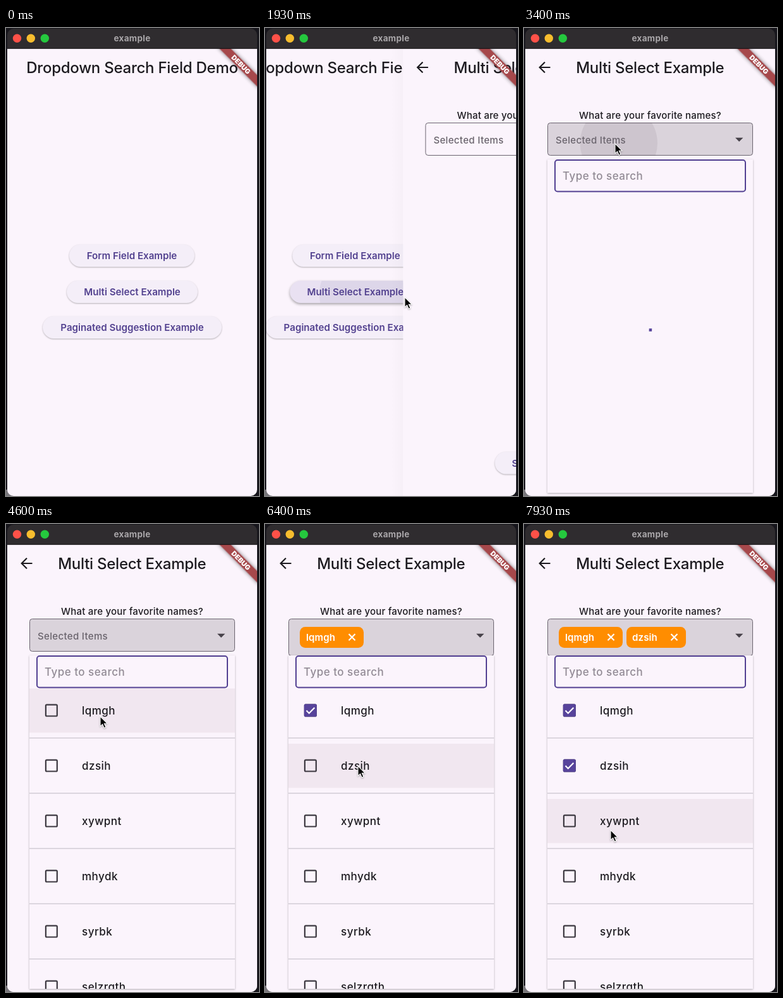
Animation of 400 by 737 pixels, one loop 8 s. Source, as an HTML page:

```html
<!DOCTYPE html>
<html lang="en">
<head>
<meta charset="utf-8">
<title>Dropdown Search Field Demo</title>
<style>
  html, body { margin: 0; width: 100%; height: 100%; overflow: hidden; background: #16151b; }
  svg { display: block; width: 100vw; height: 100vh; }
  text { font-family: Inter, Roboto, sans-serif; font-weight: 450; fill: #1d1b20; }
  .mid { text-anchor: middle; }
  .title { font-size: 24px; letter-spacing: -.25px; }
  .label { font-size: 15.1px; font-weight: 600; letter-spacing: .02px; fill: #52418f; }
  .ask { font-size: 15px; letter-spacing: .2px; }
  .hint { font-size: 15px; letter-spacing: .34px; fill: #6a646d; }
  .body { font-size: 17px; letter-spacing: .48px; }
  .chip { font-size: 15.1px; font-weight: 600; letter-spacing: .1px; fill: #fff; }
  .pill { fill: #f4eef8; filter: drop-shadow(0 1.2px 1px rgba(0,0,0,.28)); }
  .pill.over { filter: drop-shadow(0 2px 2px rgba(0,0,0,.34)); }
  .stroke { fill: none; stroke-width: 2.2; }
</style>
</head>
<body>
<svg viewBox="0 0 400 737">
  <defs>
    <clipPath id="win"><path d="M2 32H397V727a10 10 0 0 1-10 10H12a10 10 0 0 1-10-10Z"/></clipPath>
    <clipPath id="panelClip"><rect x="37" y="207" width="325" height="525"/></clipPath>
    <clipPath id="fieldClip"><rect x="37" y="149" width="325" height="52" rx="4"/></clipPath>
    <clipPath id="pillClip"><rect x="96" y="398" width="207" height="35" rx="17.5"/></clipPath>
    <linearGradient id="edge"><stop stop-opacity="0"/><stop offset="1" stop-opacity=".018"/></linearGradient>
  </defs>
  <rect width="400" height="737" fill="#16151b"/>
  <rect y="727" width="14" height="10" fill="#77757a"/>
  <path d="M2 33V11A10 10 0 0 1 12 1H387a10 10 0 0 1 10 10V33Z" fill="#2f2c2f"/>
  <g clip-path="url(#win)">
    <rect width="400" height="737" fill="#fbf4fc"/>
    <g id="home">
      <text class="title mid" x="199.5" y="70.7">Dropdown Search Field Demo</text>
      <g id="pills"></g>
    </g>
    <g id="page">
      <rect x="-18" y="32" width="20" height="705" fill="url(#edge)"/>
      <rect x="2" y="32" width="398" height="705" fill="#fbf4fc"/>
      <path class="stroke" stroke="#1d1b20" d="M41.5 62H25.5M33 53.7L24.7 62L33 70.3"/>
      <text class="title mid" x="199.3" y="70.7">Multi Select Example</text>
      <text class="ask mid" x="199.5" y="143.3">What are your favorite names?</text>
      <rect class="pill" x="147" y="667.5" width="105" height="35" rx="17.5"/>
      <text class="label mid" x="199.5" y="690.5">Submit</text>
      <rect id="field" x="37.5" y="149.5" width="324" rx="4" fill="#1e141e" stroke="#6b6570"/>
      <g clip-path="url(#fieldClip)"><circle id="fieldInk" fill="#1e141e"/></g>
      <path d="M334 172.7H346.4L340.2 179Z" fill="#47424a"/>
      <text id="hint" class="hint" x="50" y="181.5">Selected Items</text>
      <g id="chips"></g>
      <rect id="tip" x="109" y="204.5" width="59" height="28" rx="4" fill="#655d70"/>
      <g id="panel">
        <rect x="37" y="207" width="325" height="525" fill="#fbf4fc"
          style="filter:drop-shadow(0 1.5px 1.5px rgba(0,0,0,.3))"/>
        <path id="spin" fill="none" stroke="#57439b" stroke-width="4.5" stroke-linecap="square"/>
        <g id="list" clip-path="url(#panelClip)"></g>
        <rect x="49" y="208" width="301" height="49.5" rx="4" fill="#fbf4fc" stroke="#524092" stroke-width="2"/>
        <text class="body" x="61" y="239" style="fill:#928b95">Type to search</text>
      </g>
    </g>
    <g transform="translate(397 32) rotate(45)">
      <rect x="-45" y="29.7" width="90" height="12.7" fill="#a6484b" style="filter:drop-shadow(0 0 3px rgba(0,0,0,.5))"/>
      <text class="mid" y="40" style="font-size:10.8px;font-weight:900;fill:#fff">DEBUG</text>
    </g>
  </g>
  <path d="M2 32.3H397" stroke="#0c0b0d"/>
  <circle cx="17.5" cy="16.3" r="6.7" fill="#fe5148"/>
  <circle cx="39.3" cy="16.3" r="6.7" fill="#f7bd2e"/>
  <circle cx="61.3" cy="16.3" r="6.7" fill="#25c83e"/>
  <text class="mid" x="199.5" y="20.5" style="font-size:13.5px;font-weight:700;letter-spacing:.3px;fill:#a9a6a9">example</text>
  <path id="cursor" d="M0 0V15.6L3.6 12.3L6.2 18.2L8.9 17L6.3 11.2H11Z" fill="#000" stroke="#fff" stroke-width="1.1"
    style="filter:drop-shadow(0 1px 1px rgba(0,0,0,.3))"/>
</svg>
<script>
const LOOP = 8000;
const PUSH = 1848, OPEN = 3385, LOADED = 3890;
const ROW = 87, ROW_TOP = 259, TILE = 69.5;
const $ = id => document.getElementById(id);
const clamp = v => Math.max(0, Math.min(1, v));
const lerp = (a, b, p) => a + (b - a) * p;
const part = (t, start, dur) => clamp((t - start) / dur);
const show = (el, on) => el.setAttribute('visibility', on ? 'inherit' : 'hidden');
const set = (el, attrs) => { for (const k in attrs) el.setAttribute(k, attrs[k]); };

function bezier(x1, y1, x2, y2) {
  const at = (a, b, s) => 3 * a * s * (1 - s) ** 2 + 3 * b * s * s * (1 - s) + s ** 3;
  return x => {
    if (x <= 0 || x >= 1) return clamp(x);
    let lo = 0, hi = 1;
    for (let i = 0; i < 24; i++) {
      const m = (lo + hi) / 2;
      if (at(x1, x2, m) < x) lo = m; else hi = m;
    }
    return at(y1, y2, lo);
  };
}
const ease = bezier(.25, .1, .25, 1);
const fastSlow = bezier(.4, 0, .2, 1);
const behind = bezier(.35, .91, .33, .97);
const slideA = bezier(.283, .044, .545, .57), slideB = bezier(.209, 1, .4345, .976);
const slide = p => p < .198 ? .541 * slideA(p / .198) : .541 + .459 * slideB((p - .198) / .802);

// Home buttons: label, x, y, width
const buttons = [
  ['Form Field Example', 100, 341, 198],
  ['Multi Select Example', 96, 398, 207],
  ['Paginated Suggestion Example', 58, 454, 283]
];
$('pills').innerHTML = buttons.map(([label, x, y, w], i) => `
  <rect class="pill" x="${x}" y="${y}" width="${w}" height="35" rx="17.5"/>
  <rect class="glow" x="${x}" y="${y}" width="${w}" height="35" rx="17.5" fill="#57439b" opacity=".07"/>
  ${i === 1 ? '<g clip-path="url(#pillClip)"><circle id="pillInk" fill="#2c2050"/></g>' : ''}
  <text class="label mid" x="${x + w / 2}" y="${y + 23}">${label}</text>`).join('');
const pills = [...$('pills').querySelectorAll('.pill')];
const glows = [...$('pills').querySelectorAll('.glow')];

// Picked rows: time of the tap, ripple start
const picks = [{ tap: 4750, ink: 4680 }, { tap: 6930, ink: 6860 }];
const names = ['lqmgh', 'dzsih', 'xywpnt', 'mhydk', 'syrbk', 'selzrqth'];
$('list').innerHTML = names.map((name, i) => {
  const y = ROW_TOP + ROW * i;
  return `<clipPath id="tile${i}"><rect x="37" y="${y}" width="325" height="${TILE}"/></clipPath>
  <rect class="hover" x="37" y="${y}" width="325" height="${TILE}" fill="#f1e7f0"/>
  <g clip-path="url(#tile${i})"><circle class="ink" fill="#1e141e" r="0"/></g>
  <rect class="stroke" x="62.9" y="${y + 25.6}" width="17.9" height="17.9" rx="1.5" stroke="#3d3941"/>
  <rect class="fill" x="61.8" y="${y + 24.5}" width="20" height="20" rx="2" fill="#57439b" opacity="0"/>
  <path class="tick stroke" stroke="#fff" pathLength="1" stroke-dasharray="1 2"
    d="M65.5 ${y + 34.8}L69.7 ${y + 39}L78.3 ${y + 30.2}"/>
  <text class="body" x="120" y="${y + 41}">${name}</text>
  <path d="M37 ${y + 78}H362" stroke="#dcd6df" stroke-width="1.8"/>`;
}).join('');
const all = sel => [...$('list').querySelectorAll(sel)];
const hovers = all('.hover'), inks = all('.ink'), fills = all('.fill'), ticks = all('.tick');

const chipBoxes = [[55, 101, 65], [162, 94, 171]];
$('chips').innerHTML = chipBoxes.map(([x, w, tx], i) => {
  const c = x + w - 18.5;
  return `<g><rect x="${x}" y="162" width="${w}" height="33" rx="8.5" fill="#ff8d00"/>
  <text class="chip" x="${tx}" y="183.7">${names[i]}</text>
  <path class="stroke" stroke="#fff" d="M${c - 5} 173.3l10 10m0 -10l-10 10"/></g>`;
}).join('');
const chips = [...$('chips').children];

// Pointer stops: time, x, y
const stops = [
  [70, 399, 470], [270, 372, 460], [600, 372, 460], [1400, 221, 424],
  [2350, 221, 424], [3100, 144, 182], [4070, 144, 182], [4400, 149, 303],
  [5060, 149, 303], [5400, 129, 171], [5640, 129, 171], [6270, 147, 381],
  [7200, 147, 381], [7720, 137, 482], [LOOP, 137, 482]
];
function pointer(t) {
  const i = stops.findIndex(s => s[0] > t);
  if (i < 1) return [-50, -50];
  const [a, b] = [stops[i - 1], stops[i]];
  const p = part(t, a[0], b[0] - a[0]), e = p * p * (3 - 2 * p);
  return [lerp(a[1], b[1], e), lerp(a[2], b[2], e)];
}

function ripple(el, t, start, dur, from, to, radius, alpha, fadeAt) {
  const p = ease(part(t, start, dur));
  set(el, {
    cx: lerp(from[0], to[0], p), cy: lerp(from[1], to[1], p),
    r: lerp(.3 * radius, radius, p),
    opacity: t < start ? 0 : alpha * part(t, start, 50) * (1 - part(t, fadeAt, 375))
  });
}

function spinner(t) {
  const ms = Math.max(0, t - 3395), path = ms / 1333 % 1;
  const head = fastSlow(clamp(path * 2)), tail = fastSlow(clamp(path * 2 - 1));
  const a = -Math.PI / 2 + tail * 1.5 * Math.PI + ms / 2222 * 2 * Math.PI + path * .5 * Math.PI;
  const sweep = Math.max((head - tail) * 1.5 * Math.PI, .001);
  const at = ang => `${199.5 + 18 * Math.cos(ang)} ${493.5 + 18 * Math.sin(ang)}`;
  $('spin').setAttribute('d', `M${at(a)}A18 18 0 ${sweep > Math.PI ? 1 : 0} 1 ${at(a + sweep)}`);
}

function draw(t) {
  const [x, y] = pointer(t);
  const inside = (l, top, w, h) => x >= l && x < l + w && y >= top && y < top + h;
  $('cursor').setAttribute('transform', `translate(${x} ${y})`);

  const p = part(t, PUSH, 500), pushed = p >= 1;
  $('home').setAttribute('transform', `translate(${-131.7 * behind(p)} 0)`);
  $('page').setAttribute('transform', `translate(${395 * (1 - slide(p))} 0)`);
  show($('home'), !pushed);
  show($('page'), t >= PUSH);
  buttons.forEach(([, bx, by, w], i) => {
    const over = inside(bx, by, w, 35);
    pills[i].classList.toggle('over', over);
    show(glows[i], over);
  });
  ripple($('pillInk'), t, 1815, 400, [221, 424], [199.5, 415.5], 105, .06, 1960);

  const picked = t >= picks[0].tap, open = t >= OPEN, loaded = t >= LOADED;
  const overField = pushed && inside(37, 149, 325, picked ? 58 : 52);
  const focus = .15 * part(t, 3330, 60);
  set($('field'), {
    height: picked ? 58 : 51,
    'fill-opacity': focus + (overField ? (picked ? .06 : focus ? 0 : .05) : 0)
  });
  ripple($('fieldInk'), t, 3348, 500, [144, 182], [199.5, 175], 164, .07, 3450);
  show($('hint'), !picked);
  chips.forEach((c, i) => show(c, t >= picks[i].tap));
  show($('tip'), picked && inside(123, 162, 33, 33));

  show($('panel'), open);
  show($('spin'), open && !loaded);
  show($('list'), loaded);
  if (open && !loaded) spinner(t);
  names.forEach((_, i) => show(hovers[i], loaded && inside(37, ROW_TOP + ROW * i, 325, TILE)));
  picks.forEach(({ tap, ink }, i) => {
    const top = ROW_TOP + ROW * i, q = part(t, tap, 200);
    ripple(inks[i], t, ink, 225, [148, top + 42], [199.5, top + 34.7], 167, .095, ink + 200);
    fills[i].setAttribute('opacity', clamp(q * 4));
  });
  ticks.forEach((tick, i) => {
    const q = picks[i] ? part(t, picks[i].tap + 100, 100) : 0;
    show(tick, loaded && q > 0);
    tick.setAttribute('stroke-dashoffset', 1 - q);
  });
}

const began = performance.now();
function frame() {
  draw((performance.now() - began) % LOOP);
  requestAnimationFrame(frame);
}
frame();
</script>
</body>
</html>
```
